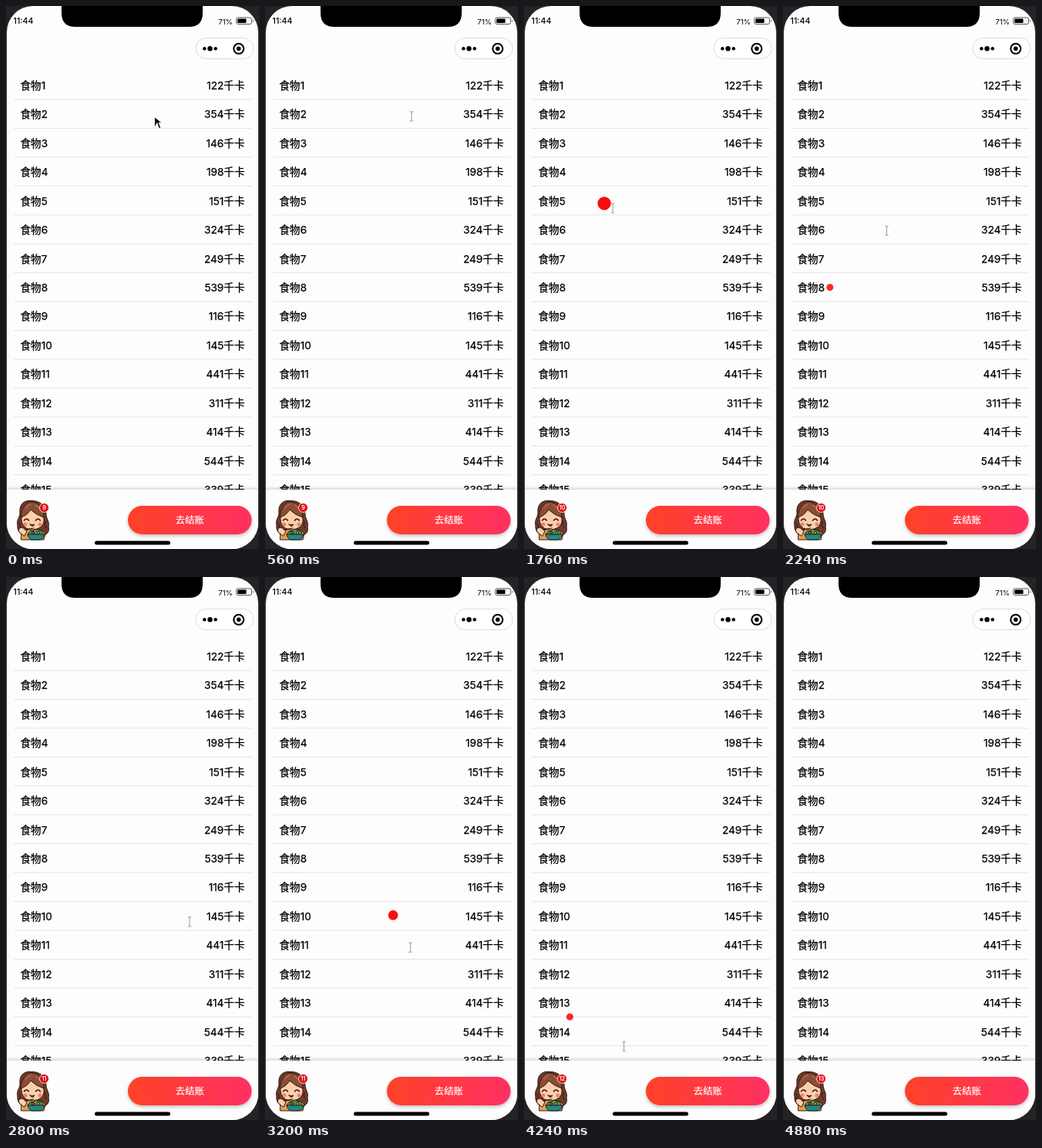
Recreate the animation shown at these times as an HTML page. Size 328 by 704 pixels, loop 4.96 s.

```html
<!DOCTYPE html>
<html lang="zh-CN">
<head>
<meta charset="utf-8">
<style>
html, body { margin: 0; width: 100%; height: 100%; overflow: hidden; background: #242426; }
svg { display: block; width: 328px; height: 704px; font-family: Inter, "Noto Sans CJK SC", "Noto Sans CJK", sans-serif; }
.rows { font-size: 13.6px; }
.rows text { stroke: #000; stroke-width: .25; }
.rows path { stroke: #e4e4e4; }
.end { text-anchor: end; }
.mid { text-anchor: middle; fill: #fff; stroke: #fff; stroke-width: .2; }
</style>
</head>
<body>
<svg viewBox="0 0 328 704">
  <defs>
    <linearGradient id="warm"><stop stop-color="#ff4127"/><stop offset="1" stop-color="#ff3162"/></linearGradient>
    <linearGradient id="shade" x2="0" y2="1"><stop stop-color="#000" stop-opacity="0"/><stop offset="1" stop-color="#000" stop-opacity=".13"/></linearGradient>
    <filter id="soft" x="-10%" y="-30%" width="120%" height="170%"><feDropShadow dx="0" dy="2" stdDeviation="2" flood-opacity=".25"/></filter>
    <clipPath id="screen"><rect x="1" width="326" height="704" rx="34"/></clipPath>
  </defs>
  <g clip-path="url(#screen)">
    <rect width="328" height="704" fill="#fdfdfd"/>
    <g class="rows" id="rows"></g>
    <rect y="622" width="328" height="5" fill="url(#shade)"/>
    <rect y="627" width="328" height="77" fill="#fdfdfd"/>
  </g>

  <path d="M72 0V9Q72 27 90 27H237Q255 27 255 9V0Z"/>
  <text x="9.5" y="23" font-size="10.6" font-weight="500">11:44</text>
  <text class="end" x="294" y="23.5" font-size="9.6">71%</text>
  <rect x="298.5" y="15" width="20" height="8.5" rx="2.3" fill="none" stroke="#555"/>
  <rect x="300" y="16.5" width="11.5" height="5.5" rx="1"/>
  <path d="M320 17.5q1.8 1.8 0 3.6z" fill="#333"/>
  <rect x="246" y="41.5" width="75" height="27" rx="13.5" fill="#fff" stroke="#dcdcdc"/>
  <circle cx="257.3" cy="55.3" r="2.2"/><circle cx="264.5" cy="55.3" r="3.2"/><circle cx="271.7" cy="55.3" r="2.2"/>
  <circle cx="301.7" cy="55.3" r="6.5" fill="none" stroke="#000" stroke-width="2.1"/>
  <circle cx="301.7" cy="55.3" r="2.8"/>

  <rect x="158" y="648" width="160.5" height="37" rx="18.5" fill="url(#warm)" filter="url(#soft)"/>
  <text class="mid" x="238.3" y="671" font-size="12.3">去结账</text>
  <rect x="115" y="693.5" width="98" height="5" rx="2.5"/>

  <g stroke="#2e1a18" stroke-linejoin="round" stroke-linecap="round">
    <path fill="#6e3a2b" d="M33 641.5C24 640 17 646 18 656C19 662 13 666 15 673C14 680 19 687 27 686H46C53 687 57 681 55 675C57 669 52 665 52 658C52 648 44 641 33 641.5Z"/>
    <path fill="#e8a050" d="M20 684Q25 678 35 678Q47 678 51 684L49 692H20Z"/>
    <path fill="#fccfaa" d="M20.5 661Q23 655 31 652Q39 657 48 660Q51 669 46 675Q36 682 26 677Q18 670 20.5 661Z"/>
    <path fill="#8c4d36" d="M33 642.5Q21 644 19 663Q27 661 32 653Q39 660 49 663Q50 645 33 642.5Z"/>
    <path fill="none" stroke="#c98360" d="M26 651q2-4 6-5M38 647q5 2 7 7"/>
    <path fill="none" stroke-width="1.5" d="M23.5 667q3-4 6 0M38.5 667q3-4 6 0"/>
    <path fill="#b8312b" d="M31 672q3 1.5 6 0q-2.5 5-6 0Z"/>
    <g stroke="none" fill="#f4836f"><circle cx="25" cy="672" r="2.5"/><circle cx="44" cy="672" r="2.5"/></g>
    <path fill="none" d="M17 670q3 4 0 8M51 668q-2 5 1 9"/>
    <path fill="#4a9b4a" d="M29 685q1-6 6-4q4-5 7-1q6-1 6 5Z"/>
    <circle cx="35" cy="683" r="1.8" fill="#d94430"/><circle cx="42" cy="683" r="1.6" fill="#f2c14c"/>
    <path fill="#1f8a86" d="M28 685H50Q48 692 43 692H34Q29 691 28 685Z"/>
    <path fill="#fccfaa" d="M17 682q-2-5 3-6q5 1 7 5l-3 6Z"/>
    <path fill="none" d="M24 679L36 677"/>
  </g>
  <circle cx="49.5" cy="650.5" r="6" fill="#df1118" stroke="#fff" stroke-width=".8"/>
  <text class="mid" id="count" x="49.5" y="653.1" font-size="7.2" font-weight="500"></text>

  <circle id="ball" fill="#fa0c0c"/>
  <g id="cursor">
    <path id="arrow" d="M-.3-6V7.8L2.9 1.6L5.2 8.5L7.6 7.6L5.1 1.2H8.8Z" stroke="#fff" stroke-width=".8"/>
    <path id="beam" d="M-2.2-6.5Q0-6.5 0-4.5V4.5Q0 6.5-2.2 6.5M2.2-6.5Q0-6.5 0-4.5M0 4.5Q0 6.5 2.2 6.5" fill="none" stroke="#808080" stroke-width=".8"/>
  </g>
</svg>
<script>
const LOOP = 4960, FLIGHT = 800, CART = { x: 35, y: 665 };
const energy = [122, 354, 146, 198, 151, 324, 249, 539, 116, 145, 441, 311, 414, 544, 339];
// launch time, x, y
const launches = [[748, 174, 148], [1728, 107, 270.5], [2936, 231, 454], [3720, 105, 538]];
// time, x, y
const path = [[0, 193, 150], [560, 190, 143], [760, 182, 141], [1200, 119, 270], [1680, 115, 262], [2080, 115, 262],
  [2720, 238, 447], [2960, 238, 447], [3520, 113, 531], [4000, 113, 531], [4480, 146, 685], [4640, 150, 720]];

const $ = id => document.getElementById(id);
const set = (id, attrs) => Object.entries(attrs).forEach(([k, v]) => $(id).setAttribute(k, v));
const mix = (a, b, p) => a + (b - a) * p;

$("rows").innerHTML = energy.map((n, i) => {
  const y = 108 + 37.43 * i;
  return `<text x="18.5" y="${y}">食物${i + 1}</text><text class="end" x="309.5" y="${y}">${n}千卡</text><path d="M10 ${y + 13.2}H319"/>`;
}).join("");

// cubic-bezier(.5, -.5, 1, 1): a small hop, then a fall
function fall(p) {
  const curve = (s, a) => 3 * s * (1 - s) ** 2 * a + 3 * s * s * (1 - s) + s ** 3;
  let lo = 0, hi = 1;
  for (let i = 0; i < 24; i++) {
    const s = (lo + hi) / 2;
    if (curve(s, .5) < p) lo = s; else hi = s;
  }
  return curve(lo, -.5);
}

function drawBall(t) {
  const shot = launches.find(([start]) => t >= start && t < start + FLIGHT);
  if (!shot) return set("ball", { opacity: 0 });
  const [start, x, y] = shot, p = (t - start) / FLIGHT;
  set("ball", {
    cx: mix(x, CART.x, p),
    cy: mix(y, CART.y, fall(p)),
    r: 9 * Math.max(.5, 1 - .9 * p),
    opacity: 1 - .7 * p ** 4
  });
}

function drawCursor(t) {
  const next = path.findIndex(([time]) => time > t);
  set("cursor", { visibility: next < 0 ? "hidden" : "visible" });
  if (next < 0) return;
  const [t0, x0, y0] = path[next - 1], [t1, x1, y1] = path[next];
  const p = (t - t0) / (t1 - t0), ease = p * p * (3 - 2 * p), y = mix(y0, y1, ease);
  const arrow = t < 240 || y > 627;
  set("cursor", { transform: `translate(${mix(x0, x1, ease)} ${y})` });
  set("arrow", { opacity: +arrow });
  set("beam", { opacity: +!arrow });
}

function frame() {
  const t = performance.now() % LOOP;
  $("count").textContent = 9 + launches.filter(([start]) => t >= start + FLIGHT).length;
  drawBall(t);
  drawCursor(t);
  requestAnimationFrame(frame);
}
frame();
</script>
</body>
</html>
```
